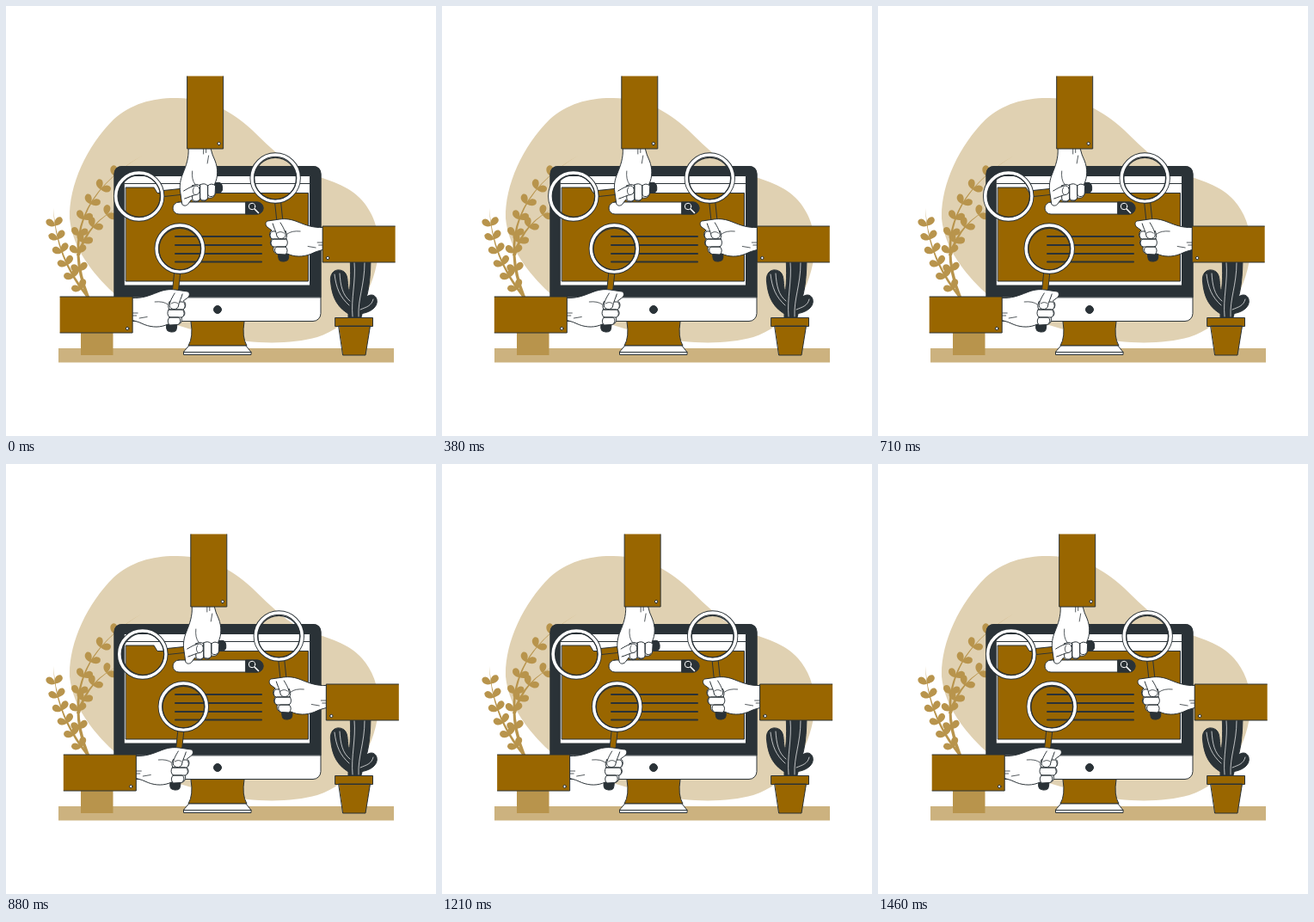
Animation, 500 px wide and 500 px high, one loop 1500 ms. Source, as an HTML page:

```html
<!DOCTYPE html>
<html lang="en">
<head>
<meta charset="utf-8">
<title>Searching hands</title>
<style>
  html, body { margin: 0; height: 100%; overflow: hidden; background: #fff; }
  svg { display: block; width: 100vw; height: 100vh; }
  .ink { stroke: #2a3237; stroke-linecap: round; stroke-linejoin: round; }
  .brown { fill: #996600; }
  .dark { fill: #2a3237; }
  .white { fill: #fff; }
  .line { fill: none; }
  .pale { stroke: #fff; }
</style>
</head>
<body>
<svg viewBox="0 0 500 500">
  <defs>
    <g id="arm" class="ink">
      <g transform="rotate(6 202 282)">
        <path class="brown" d="M198.500 311H205.500V362H198.500Z"/>
        <path class="dark" d="M196 350H208V374Q208 379.500 202 379.500T196 374Z"/>
      </g>
      <circle class="line" cx="202" cy="282" r="27" stroke-width="5.400"/>
      <circle class="line pale" cx="202" cy="282" r="27" stroke-width="3.600"/>
      <circle class="line" cx="202" cy="282.600" r="24.300" stroke-width="1.200"/>
      <path class="white" d="M147 339.500C158 340 166 337 176 333C183 330 190 329 197 330L211 332C214 333 214 338 210 340L206 343C210 345 209 351 206 353C209 356 208 361 204 362C205 367 203 370 199 370.500L188 370C180 374 170 374 161 370.500Q154 367 147 365.500Z"/>
      <path class="white" d="M190 344H205C209 345 209 352 205 353H190Q187 349 190 344ZM189 353H204C208 354 208 361 204 362H190Q186 358 189 353ZM190 362H200C204 363 203 370 199 370.500L190 371Q186 366 190 362Z"/>
      <path class="white" d="M196 334C193 339 190 344 190 349C191 353 198 354 200 350C201 344 204 339 205 335"/>
      <path class="line" d="M192 346Q196 343 200 346M173 344Q183 343 188 347M147 357H153M147 360H151.500M155 363L164 361.500" stroke-width=".8"/>
      <path class="brown" stroke="none" d="M62.500 338H147V380H62.500Z"/>
      <path class="line" d="M62.500 338H147V380H62.500" stroke-linecap="butt"/>
      <circle class="white" cx="141" cy="375" r="1.700"/>
    </g>
  </defs>

  <path fill="#e0d1b2" d="M196 107C232 106 260 120 286 144C310 167 328 186 352 195C374 202 398 208 414 226C428 242 436 264 432.500 292C426 336 400 373 362 385C330 394 286 393 250 385C200 373 150 358 120 329C94 303 77 277 74 247C73 208 94 163 125 132C145 114 170 107 196 107Z"/>
  <path fill="#ccb27f" d="M61 398H451V414.500H61Z"/>
  <g id="plant" fill="#b8944c"><path d="M87 370H124.500V406H87Z"/></g>

  <g class="ink">
    <path class="brown" d="M215 367Q218 385 212 395H280Q274 385 277 367Z"/>
    <path class="white" d="M213 395H279L285 402.500V405.500H206.500V402.500Z"/>
    <path class="line" d="M206.500 402.500H285"/>
    <rect class="white" x="126" y="186.500" width="240" height="180" rx="9"/>
    <path class="dark" d="M126 338.500V195.500Q126 186.500 135 186.500H357Q366 186.500 366 195.500V338.500Z"/>
    <path class="white" d="M137.500 197.500H353.500V325H137.500Z"/>
    <path class="brown" d="M139.500 211H172L176 217.500H351.500V320H139.500Z"/>
    <path class="line" d="M138 206.500H353"/>
    <circle class="dark" cx="246" cy="353" r="4.500"/>
    <rect class="white" x="194" y="228" width="105" height="14" rx="7"/>
    <path class="dark" d="M279 228H292A7 7 0 0 1 292 242H279Z"/>
    <g class="line pale"><circle cx="286" cy="233" r="3.700"/><path d="M289 236L293.500 240.500" stroke-width="1.600"/></g>
    <path class="line" stroke-width="2" d="M197 268H297M197 278H297M197 288H297M197 297.500H297"/>
  </g>

  <g class="ink">
    <path class="dark" d="M400 290H424C424 315 422 330 418 343L413 362H398L398 340C401 325 401 310 400 290Z"/>
    <path class="dark" d="M377.500 320C376 308 386 304 393 309C399 314 396 324 399 332L404 340L402 360C386 352 379 340 377.500 320Z"/>
    <path class="dark" d="M410 358C425 357 433 349 431 341C429 334 421 335 418 340L409 346Z"/>
    <path class="line pale" stroke-width=".7" d="M405 298C407 320 401 340 403 361M417 298C417 325 409 340 410 361M382 312C384 328 388 338 399 348M388 311C389 325 391 336 400 343M427 341C425 349 419 350 412 353"/>
    <path class="brown" d="M387 372H423.500L418 406H392ZM383 362.500H426.500V372.500H383Z"/>
  </g>

  <g id="hands">
    <use href="#arm"/>
    <use href="#arm" transform="matrix(-1 0 0 1 515 -82)"/>
    <use href="#arm" transform="matrix(0 1 1 0 -127.500 19)"/>
  </g>
</svg>
<script>
  const plant = document.getElementById('plant');
  const hands = document.getElementById('hands');

  // A tapering quadratic stem with pairs of leaves between parameters from and to
  function branch(x0, y0, x1, y1, x2, y2, pairs, from, to) {
    let svg = `<path d="M${x0 - 2} ${y0}Q${x1 - 1} ${y1} ${x2} ${y2}Q${x1 + 1} ${y1} ${x0 + 2} ${y0}"/>`;
    const at = (a, b, c, t) => (1 - t) ** 2 * a + 2 * t * (1 - t) * b + t * t * c;
    const slope = (a, b, c, t) => (1 - t) * (b - a) + t * (c - b);
    for (let i = 0; i < pairs; i++) {
      const t = from + (to - from) * i / (pairs - 1);
      const angle = Math.atan2(slope(y0, y1, y2, t), slope(x0, x1, x2, t)) * 180 / Math.PI;
      for (const side of [-48, 48])
        svg += `<path d="M0 0C3 -5 10 -6 12 -1C12 5 5 5 0 0" transform="translate(${at(x0, x1, x2, t)} ${at(y0, y1, y2, t)}) rotate(${angle + side})"/>`;
    }
    plant.insertAdjacentHTML('beforeend', svg);
  }
  branch(95, 338, 58, 293, 55, 235, 6, .1, .82);
  branch(95, 338, 55, 235, 158, 174, 7, .15, .82);
  branch(84, 290, 95, 250, 135, 233, 3, .2, .75);

  // Horizontal shake: one offset per tenth of the loop, shown at 24 steps per second
  const shake = [0, -1, 2, -4, 4, -4, 4, -4, 2, -1, 0];
  const loop = 1500, step = 1000 / 24, lead = 25;

  function draw(now) {
    const held = Math.floor((now % loop + 4) / step) * step;
    const phase = (held + lead) % loop / loop * 10;
    const i = Math.floor(phase);
    const x = shake[i] + (shake[i + 1] - shake[i]) * (phase - i);
    hands.setAttribute('transform', `translate(${x + .3} 0)`);
  }

  const start = performance.now();
  function tick() {
    draw(performance.now() - start);
    requestAnimationFrame(tick);
  }
  tick();
</script>
</body>
</html>
```
